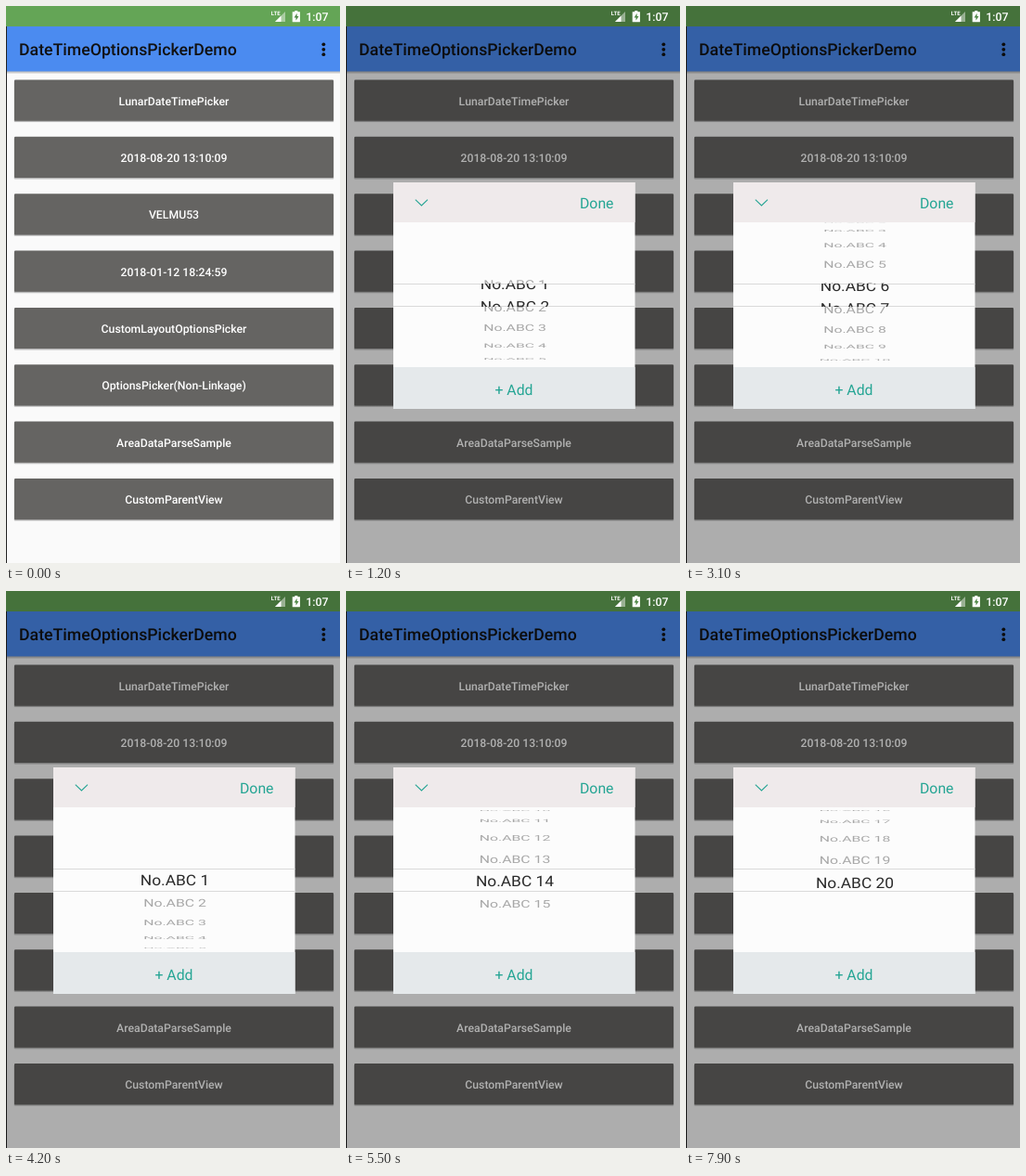
An HTML page for the animation above (8000 ms loop, 360 by 600 pixels).

```html
<!DOCTYPE html>
<html lang="en">
<head>
<meta charset="utf-8">
<title>Options picker</title>
<style>
  html, body { margin: 0; width: 100%; height: 100%; overflow: hidden; background: #fafafa; }
  svg { display: block; width: 100%; height: 100%; }
  text { font-family: Roboto, "Noto Sans", sans-serif; text-rendering: geometricPrecision; }
  .mid { text-anchor: middle; }
  .btn { font-size: 12.26px; font-weight: 500; fill: #fff; }
  .action { font-size: 15.8px; fill: #25a594; }
  .wheel text { font-size: 15.8px; }
  .outer { fill: #a8a8a8; }
  .inner { fill: #2a2a2a; }
</style>
</head>
<body>
<svg viewBox="0 0 360 600">
  <defs>
    <linearGradient id="shade" x2="0" y2="1">
      <stop offset="0" stop-opacity=".28"/>
      <stop offset="1" stop-opacity="0"/>
    </linearGradient>
    <clipPath id="outside">
      <path d="M51 233H312V299H51ZM51 324H312V389H51Z"/>
    </clipPath>
    <clipPath id="between"><rect x="51" y="299" width="261" height="25"/></clipPath>
  </defs>

  <rect width="360" height="600" fill="#fafafa"/>
  <rect width="360" height="22" fill="#64a556"/>
  <rect y="22" width="360" height="48.5" fill="#4b8bf0"/>
  <rect y="70.5" width="360" height="3" fill="url(#shade)"/>
  <text x="14" y="53.3" font-size="17.7" font-weight="500" fill="#111">DateTimeOptionsPickerDemo</text>
  <g fill="#111">
    <circle cx="342.3" cy="41.3" r="1.9"/>
    <circle cx="342.3" cy="46.8" r="1.9"/>
    <circle cx="342.3" cy="52.2" r="1.9"/>
  </g>
  <g id="buttons"></g>
  <rect y="22" width="1" height="578" fill="#222"/>

  <rect id="dim" width="360" height="600" opacity="0"/>

  <g fill="#fff">
    <text x="285.8" y="10.3" font-size="6" font-weight="700">LTE</text>
    <path d="M301 6V17H290Z" opacity=".45"/>
    <path d="M296.5 10.5V17H290Z"/>
    <path d="M311.3 5h3v1.2h2.6V17.3h-8.2V6.2h2.6Z"/>
    <path d="M313.6 7.8L310.6 12.4h1.9v3.3l3-4.6h-1.9Z" fill="#4f8846"/>
    <text x="323.2" y="16.2" font-size="12.3" font-weight="500">1:07</text>
  </g>

  <g id="dialog" opacity="0">
    <rect x="51" y="190" width="260.5" height="244" fill="#fcfcfc"/>
    <rect x="51" y="190" width="260.5" height="43" fill="#efeaeb"/>
    <rect x="51" y="389" width="260.5" height="45" fill="#e5e9eb"/>
    <path d="M74.8 208.6L81.4 215L88 208.6" fill="none" stroke="#25a594" stroke-width="1.1"/>
    <text class="action" x="252" y="217.6">Done</text>
    <text class="action mid" x="181" y="418.5">+ Add</text>
    <path d="M51 299.5H311.5M51 323.5H311.5" stroke="#dadada"/>
    <g class="wheel mid">
      <g id="outer" class="outer" clip-path="url(#outside)"></g>
      <g id="inner" class="inner" clip-path="url(#between)"></g>
    </g>
  </g>
</svg>

<script>
const LOOP = 8000, STEP = 100;
const CENTER_X = 182, CENTER_Y = 312, RADIUS = 78;
const ITEM_ANGLE = Math.PI / 10, TEXT_H = 15.3, LIFT = 2.5;

const labels = ["LunarDateTimePicker", "2018-08-20 13:10:09", "VELMU53", "2018-01-12 18:24:59",
  "CustomLayoutOptionsPicker", "OptionsPicker(Non-Linkage)", "AreaDataParseSample", "CustomParentView"];

// [time, wheel position, ease-out power]
const scroll = [
  [0, 0, 1], [1100, 0, 1], [1200, .5, 1], [1600, 4, 1.6],
  [2200, 4, 1], [2300, 0, 1], [2800, 0, 1], [3100, 5.4, 1], [3500, 9, 2],
  [4100, 9, 1], [4200, 0, 1], [4600, 0, 1], [4900, 8.4, 1], [6300, 14, 3],
  [6700, 14, 1], [6800, 0, 1], [7300, 0, 1], [7900, 18.9, 1.5]
];
const addTimes = [2300, 4200, 6800];

const $ = id => document.getElementById(id);

function make(tag, attrs, parent, content = "") {
  const el = document.createElementNS("http://www.w3.org/2000/svg", tag);
  for (const key in attrs) el.setAttribute(key, attrs[key]);
  el.textContent = content;
  return parent.appendChild(el);
}

labels.forEach((label, i) => {
  const y = 79.5 + 61.35 * i, box = $("buttons");
  make("rect", { x: 8.5, y: y + 1, width: 345, height: 44.6, rx: 1.5, opacity: .16 }, box);
  make("rect", { x: 9, y: y + 43, width: 344, height: 3.2, fill: "url(#shade)" }, box);
  make("rect", { x: 9, y, width: 344, height: 44.2, rx: 1, fill: "#656462" }, box);
  make("text", { x: 181, y: y + 27, class: "btn mid" }, box, label);
});

const items = Array.from({ length: 20 }, (_, i) => ["outer", "inner"].map(
  id => make("text", {}, $(id), "No.ABC " + (i + 1))));

function positionAt(t) {
  const next = scroll.findIndex(key => key[0] >= t);
  if (next <= 0) return scroll[0][1];
  const [t0, from] = scroll[next - 1], [t1, to, power] = scroll[next];
  const u = (t - t0) / (t1 - t0);
  return from + (to - from) * (1 - (1 - u) ** power);
}

function drawWheel(t) {
  const pos = positionAt(t);
  const count = 5 + 5 * addTimes.filter(time => t >= time).length;
  items.forEach(([outer, inner], i) => {
    const angle = (i - pos) * ITEM_ANGLE;
    const shown = i < count && Math.abs(angle) < 1.55;
    outer.style.display = inner.style.display = shown ? "" : "none";
    if (!shown) return;
    // Text is squeezed by the cosine twice: once for the row, once for its glyphs.
    const cos = Math.cos(angle), squeeze = cos * cos;
    const top = CENTER_Y + RADIUS * Math.sin(angle) - cos * TEXT_H / 2;
    const place = (el, sx, sy, base) => el.setAttribute("transform",
      `translate(${CENTER_X} ${top + sy * base}) scale(${sx} ${sy})`);
    place(outer, 1, squeeze * .8, TEXT_H);
    place(inner, 1.1, squeeze, TEXT_H - LIFT);
  });
}

function drawDialog(t) {
  const u = Math.min(1, Math.max(0, (t - 50) / 450));
  const p = 1 - (1 - u) ** 2;
  $("dim").setAttribute("opacity", .31 * p);
  $("dialog").setAttribute("opacity", Math.min(1, 1.2 * p));
  $("dialog").setAttribute("transform",
    `translate(181.3 312) scale(${.8 + .2 * p}) translate(-181.3 -312)`);
}

const start = performance.now();
function tick() {
  const elapsed = (performance.now() - start) % LOOP;
  const t = Math.floor(elapsed / STEP) * STEP;
  drawDialog(t);
  drawWheel(t);
  requestAnimationFrame(tick);
}
tick();
</script>
</body>
</html>
```
